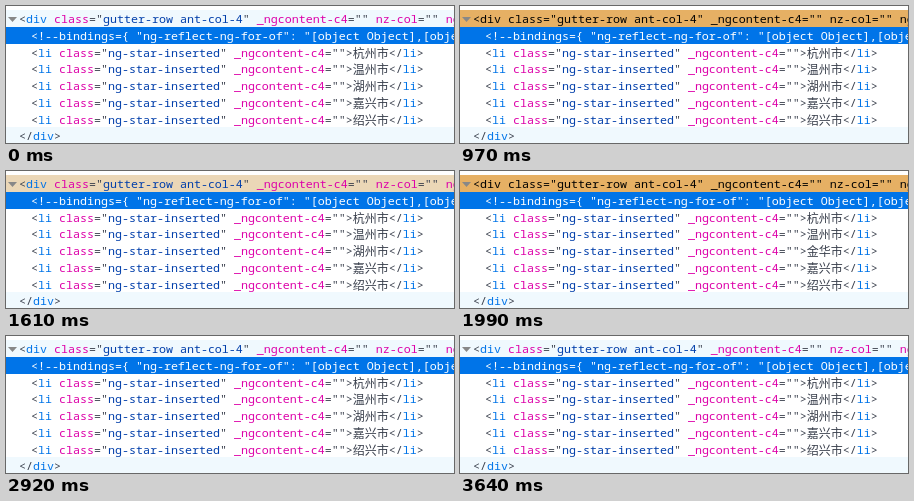
These frames come from a looping animation (448x137 px, 4.03 s). An HTML page:

```html
<!DOCTYPE html>
<html lang="zh-CN">
<meta charset="utf-8">
<title>Inspector markup flash</title>
<style>
  html, body { margin: 0; width: 100%; height: 100%; overflow: hidden; background: #fff; }
  .row {
    position: absolute; left: 0; width: 100%; height: 17px; box-sizing: border-box;
    padding-left: 25px; overflow: hidden; white-space: pre; color: #393f4c;
    font: 11.667px/17px "Noto Sans Mono", monospace; font-variant-ligatures: none;
  }
  .outer {
    padding-left: 13px;
    background: color-mix(in srgb, #e6b064 calc(var(--flash, 0) * 100%), #f0f9fe);
  }
  .selected { background: #0074e8; color: #fff; }
  .tag { color: #0074e8; }
  .attr { color: #dd00a9; }
  .value { color: #003eaa; }
  .contrast, .contrast span { color: #000; }
  .city { display: inline-block; height: 17px; vertical-align: top; font: 12px/17px "Noto Sans CJK SC", "Noto Sans CJK", sans-serif; }
  .twisty { position: absolute; left: 2px; top: 7px; width: 9px; height: 5px; background: #888; clip-path: polygon(0 0, 100% 0, 50% 100%); }
</style>
<body>
<script>
const LOOP = 4030;
const ROW_PITCH = 16.75;

// When the third city is swapped, and when each flash appears, fades and is gone
const swaps = [180, 930, 1930, 2920];
const flashes = [
  [240, 730, 1010],
  [970, 1460, 1740],
  [1990, 2480, 2760],
  [2950, 3410, 3640],
];

const span = (name, text) => `<span class="${name}">${text}</span>`;
const attr = (name, value) => ` ${span('attr', name)}="${span('value', value)}"`;
const open = (tag, attrs) => `&lt;${span('tag', tag)}${attrs}`;
const close = tag => `&lt;/${span('tag', tag)}&gt;`;

let rowCount = 0;
function addRow(html, name = '') {
  const row = document.createElement('div');
  row.className = 'row ' + name;
  row.style.top = Math.round(4 + ROW_PITCH * rowCount++) + 'px';
  row.innerHTML = html;
  document.body.append(row);
  return row;
}

const scope = attr('_ngcontent-c4', '');
const parent = addRow(
  span('twisty', '') +
  open('div', attr('class', 'gutter-row ant-col-4') + scope + attr('nz-col', '')) +
  ' ' + span('attr', 'ng-reflect'), 'outer');
addRow('&lt;!--bindings={ "ng-reflect-ng-for-of": "[object Object],[object Object]" }--&gt;', 'selected');
const items = ['杭州市', '温州市', '湖州市', '嘉兴市', '绍兴市'].map(city =>
  addRow(open('li', attr('class', 'ng-star-inserted') + scope) + '&gt;' + span('city', city) + close('li')));
addRow(close('div'), 'outer');

const thirdCity = items[2].querySelector('.city');

function flashAt(t) {
  const flash = flashes.findLast(([on]) => t >= on);
  if (!flash) return 0;
  const [, fade, end] = flash;
  return Math.min(1, Math.max(0, (end - t) / (end - fade)));
}

function draw(now) {
  const t = now % LOOP;
  const swapped = swaps.filter(time => t >= time).length % 2;
  const flash = flashAt(t);
  thirdCity.textContent = swapped ? '金华市' : '湖州市';
  parent.style.setProperty('--flash', flash);
  // Text is black while the flash holds and regains its colours as the fade begins
  parent.classList.toggle('contrast', flash === 1);
  requestAnimationFrame(draw);
}
draw(0);
</script>
</body>
</html>
```
